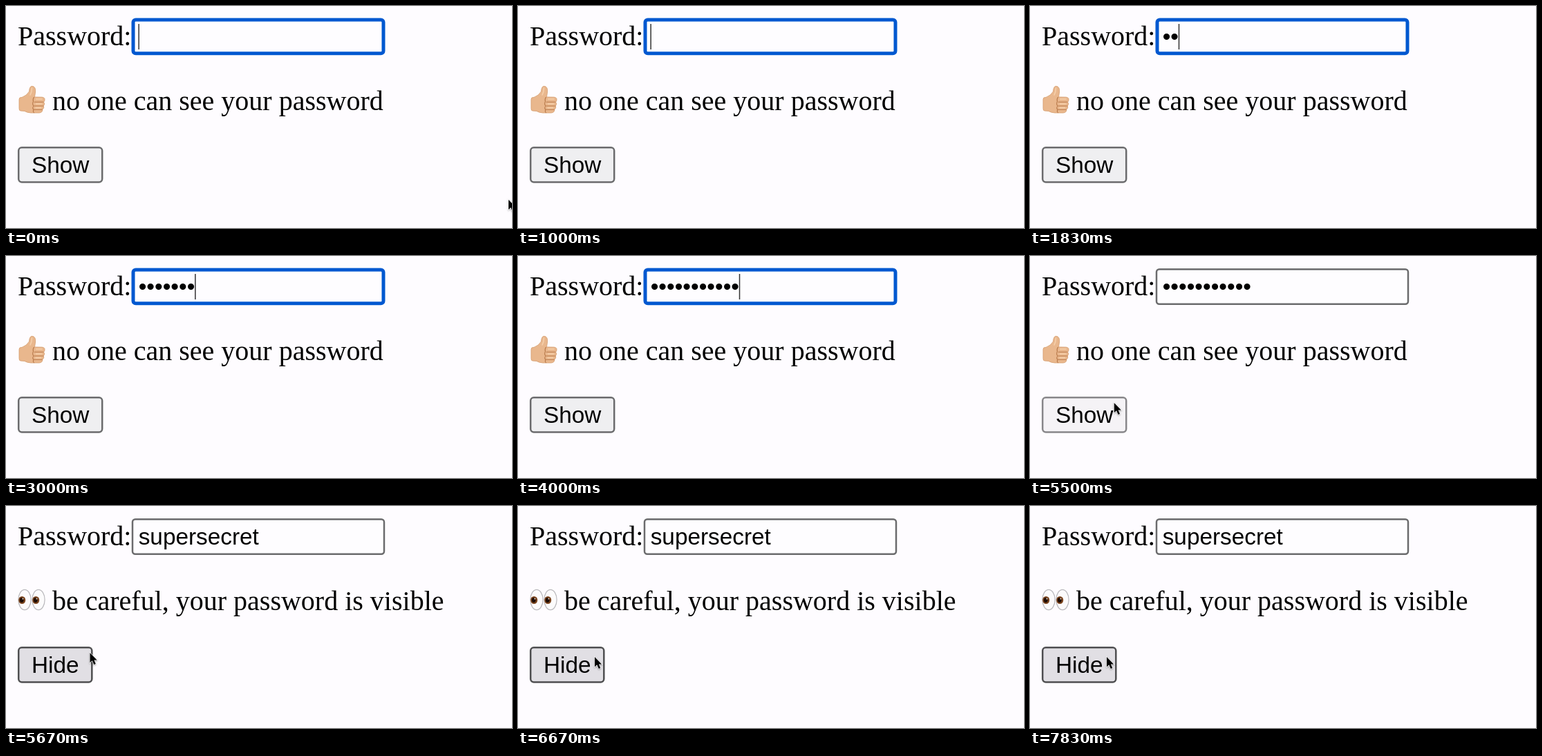
An HTML page for the animation above (8 s loop, 732 px wide and 322 px high).

```html
<!DOCTYPE html>
<html lang="en">
<head>
<meta charset="utf-8">
<title>Password visibility toggle</title>
<style>
  html, body { margin: 0; width: 100%; height: 100%; overflow: hidden; background: #fefcff; }
  svg { display: block; width: 100%; height: 100%; }
  .serif { font: 40px "Liberation Serif", "Times New Roman", serif; }
  .sans { font: 33.333px "Liberation Sans", Arial, sans-serif; }
</style>
</head>
<body>
<svg viewBox="0 0 732 322">
  <rect width="732" height="322" fill="#fefcff"/>
  <text class="serif" x="17" y="56.5">Password:</text>
  <rect id="field" fill="#fefdff"/>
  <text id="value" class="sans" x="191.7" y="56"></text>
  <rect id="caret" y="26" width="1.5" height="37" fill="#333"/>

  <g id="thumb" stroke-linejoin="round" stroke-linecap="round">
    <path fill="#e9b78d" stroke="#d59c6e" stroke-width=".8" d="M19 135Q19 132 23 132.5Q30 130 33.5 124Q34 116.5 37.5 116.3Q43.5 116.5 42.5 125L41.5 132L52 132.2Q56.5 132.8 56 136Q56 138.5 54.5 139.2Q57 142 54.3 145Q55.8 148 52.8 150Q53.2 154.5 48 155L36 155Q30 154.5 27 152.5L21 152Q19 152 19 149Z"/>
    <path fill="none" stroke="#b97a4b" stroke-width="1.1" d="M40.5 132.3Q38.5 134.5 39.5 138.5M41 139.2H54M40.5 145H53.8M40 150.2H52.3M39.5 138.5Q37.5 142 40 145Q37.5 148 40 150.2Q38.5 153 40.5 154.6"/>
    <path fill="none" stroke="#f5cfaa" stroke-width="1.6" d="M37.5 119Q37.5 125 35 129M43.5 135H52M43.5 142H51.5M43 147.6H50.5"/>
  </g>
  <g id="eyes">
    <g id="eye">
      <ellipse cx="27" cy="136" rx="9.1" ry="14.6" fill="#fcfbfc" stroke="#b9b8bc" stroke-width="1.2"/>
      <ellipse cx="23.2" cy="136.5" rx="5" ry="5.6" fill="#7a431c"/>
      <ellipse cx="22.8" cy="136.5" rx="2.9" ry="3.4" fill="#1d0d06"/>
      <circle cx="24.4" cy="134.4" r="1" fill="#e8d8ca"/>
    </g>
    <use href="#eye" x="20"/>
  </g>
  <text id="note" class="serif" x="67" y="151"></text>

  <rect id="button" x="18.2" y="205.2" height="50.2" rx="4.6" stroke-width="2.5"/>
  <text id="label" class="sans" x="37" y="242"></text>

  <path id="pointer" d="M0 0V14.2L3.3 11.2L5.8 17L8.3 15.9L5.9 10.4H10.2Z" fill="#000" stroke="#fff" stroke-width="1.3" paint-order="stroke" style="filter:drop-shadow(0 1px 1px #0005)"/>
</svg>
<script>
  const LOOP = 8000, TICK = 1000 / 6;
  const $ = id => document.getElementById(id);
  const set = (id, attrs) => {
    for (const k in attrs) $(id).setAttribute(k, attrs[k]);
  };
  const show = (id, on) => set(id, { visibility: on ? "visible" : "hidden" });
  const text = (id, s) => { if ($(id).textContent !== s) $(id).textContent = s; };

  const SECRET = "supersecret";
  // Tick at which each character arrives.
  const KEYS = [11, 11, 12, 13, 14, 17, 18, 20, 21, 22, 24];
  const BLUR = 33, CLICK = 34, HOVER = 31;
  // Pointer path after it reappears: tick, x, y.
  const PATH = [
    [28, 602, 236], [29, 330, 202], [30, 134, 190], [31, 128, 205],
    [32, 122, 213], [34, 121.5, 213], [38, 111, 219]
  ];

  function pointerAt(n) {
    if (n < 1) return [727, 281];
    if (n < PATH[0][0]) return null;
    const i = PATH.findIndex(p => p[0] >= n);
    if (i < 0) return PATH[PATH.length - 1].slice(1);
    if (i === 0) return PATH[0].slice(1);
    const [a, x, y] = PATH[i - 1], [b, u, v] = PATH[i];
    const k = (n - a) / (b - a);
    return [x + (u - x) * k, y + (v - y) * k];
  }

  function caretOn(n) {
    if (n >= BLUR) return false;
    // Each key press restarts the half-second blink.
    const last = KEYS.filter(k => k <= n).pop() ?? -1;
    return Math.floor((n - last) / 3) % 2 === 0;
  }

  function buttonLook(n) {
    if (n < HOVER) return { fill: "#efeff1", stroke: "#6b6b6d" };
    if (n === BLUR) return { fill: "#f5f3f6", stroke: "#88878a" };
    return { fill: "#e1dfe4", stroke: "#4f4f51" };
  }

  function draw(ms) {
    const n = Math.floor((ms % LOOP + 5) / TICK) % 48;
    const typed = KEYS.filter(k => k <= n).length;
    const open = n >= CLICK;

    set("field", n < BLUR
      ? { x: 184, y: 20, width: 362, height: 48.8, rx: 3.6, stroke: "#0058d0", "stroke-width": 5 }
      : { x: 183, y: 19.2, width: 364, height: 50.6, rx: 4, stroke: "#6b6b6d", "stroke-width": 2.5 });
    text("value", open ? SECRET : "•".repeat(typed));
    set("caret", { x: 191.4 + 11.67 * typed });
    show("caret", caretOn(n));

    show("thumb", !open);
    show("eyes", open);
    text("note", open ? "be careful, your password is visible" : "no one can see your password");

    set("button", { width: open ? 106.1 : 121, ...buttonLook(n) });
    text("label", open ? "Hide" : "Show");

    const p = pointerAt(n);
    show("pointer", p);
    if (p) set("pointer", { transform: `translate(${p})` });
  }

  let start;
  function loop(now) {
    start ??= now;
    draw(Math.max(0, now - start));
    requestAnimationFrame(loop);
  }
  draw(0);
  requestAnimationFrame(loop);
</script>
</body>
</html>
```
